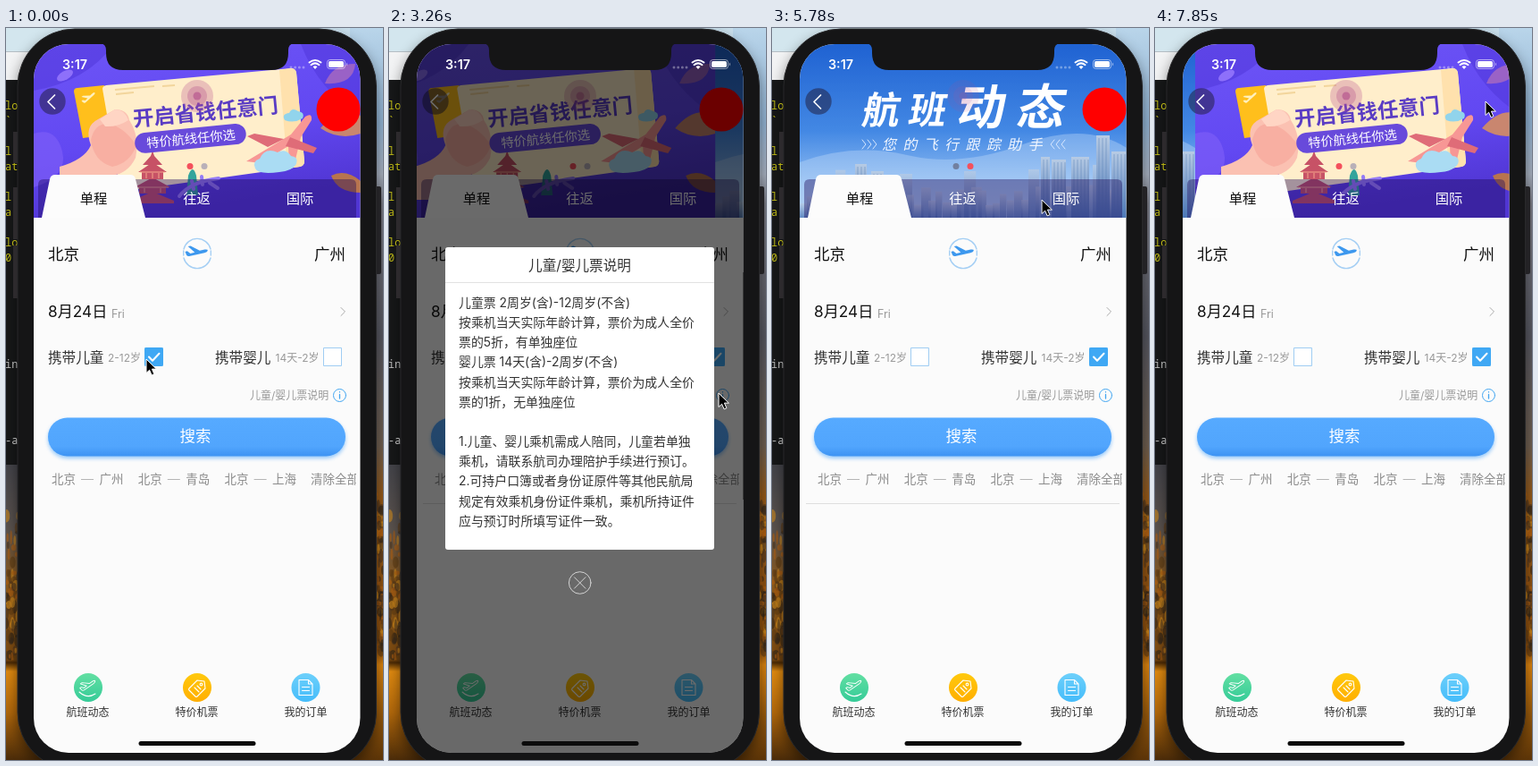
Animation, 422 px wide and 818 px high, one loop 8000 ms. Source, as an HTML page:

```html
<!DOCTYPE html>
<html lang="zh-CN">
<head>
<meta charset="utf-8">
<title>航班查询</title>
<style>
html, body { margin: 0; width: 100%; height: 100%; overflow: hidden; background: #141414; }
svg { display: block; width: 422px; height: 818px; }
text { font-family: Inter, "Noto Sans CJK SC", "Noto Sans CJK", sans-serif; white-space: pre; }
.mono text { font: 12px "Noto Sans Mono", "DejaVu Sans Mono", monospace; }
.mid { text-anchor: middle; }
.line { fill: none; stroke-linecap: round; stroke-linejoin: round; }
.anim { animation: 8s linear infinite; }
.step { animation-timing-function: step-end; }

#slides { animation-name: slides; animation-timing-function: cubic-bezier(.37,0,.63,1); }
@keyframes slides {
  0%, 38.125% { transform: translateX(0); }
  51.875%, 86.125% { transform: translateX(-366px); }
  99.875%, 100% { transform: translateX(-732px); }
}
#dot1 { animation-name: dot1; }
#dot2 { animation-name: dot2; }
@keyframes dot1 { 0% { fill: #f4505c; } 45% { fill: #72809f; } 92.8%, 100% { fill: #f4505c; } }
@keyframes dot2 { 0% { fill: #b9b0b8; } 45% { fill: #f4505c; } 92.8%, 100% { fill: #b9b0b8; } }
#halo { animation-name: halo; }
@keyframes halo { 0%, 38% { opacity: 1; } 52%, 90% { opacity: .45; } 98%, 100% { opacity: 1; } }
#childTick { animation-name: childTick; }
@keyframes childTick { 0% { visibility: visible; } 7.5%, 100% { visibility: hidden; } }
#infantTick { animation-name: infantTick; }
@keyframes infantTick { 0% { visibility: hidden; } 17.5%, 100% { visibility: visible; } }
#rule { animation-name: rule; }
@keyframes rule { 0% { visibility: hidden; } 17.5% { visibility: visible; } 95%, 100% { visibility: hidden; } }
#ball { animation-name: ball; }
@keyframes ball { 0% { visibility: visible; } 95%, 100% { visibility: hidden; } }
#alert { animation-name: alert; }
@keyframes alert { 0%, 34.2% { opacity: 0; } 38%, 60% { opacity: 1; } 63.5%, 100% { opacity: 0; } }
#debug { animation-name: debug; animation-timing-function: ease-in-out; }
@keyframes debug {
  0%, 80.6% { transform: translateY(800px); }
  85.3%, 95% { transform: translateY(0); }
  97.9%, 100% { transform: translateY(800px); }
}
#cursor { animation-name: cursor; animation-timing-function: ease-in-out; }
@keyframes cursor {
  0%, 8.5% { transform: translate(157px,370px); }
  15%, 23% { transform: translate(362px,367px); }
  30.5% { transform: translate(366px,404px); }
  37%, 41.5% { transform: translate(369px,408px); }
  48.1% { transform: translate(227px,575px); }
  54%, 63% { transform: translate(215px,622px); }
  72.2% { transform: translate(302px,192px); }
  77.5%, 84% { transform: translate(371px,88px); }
  89%, 100% { transform: translate(370px,82px); }
}
</style>
</head>
<body>
<svg viewBox="0 0 422 818" xmlns="http://www.w3.org/2000/svg">
<defs>
  <clipPath id="screen"><rect x="31" y="18" width="365.500" height="792" rx="39"/></clipPath>
  <clipPath id="banner"><rect x="31" y="18" width="366" height="194"/></clipPath>
  <clipPath id="recent"><rect x="40" y="490" width="352" height="30"/></clipPath>
  <linearGradient id="sideL" x2="0" y2="1">
    <stop offset="0" stop-color="#44444a"/><stop offset=".22" stop-color="#5b534e"/><stop offset=".4" stop-color="#8d5a1c"/>
    <stop offset=".66" stop-color="#7c4a10"/><stop offset=".67" stop-color="#4a2905"/><stop offset=".7" stop-color="#e08a10"/>
    <stop offset=".84" stop-color="#b2680b"/><stop offset="1" stop-color="#4a2b09"/>
  </linearGradient>
  <linearGradient id="sideR" x2="0" y2="1">
    <stop offset="0" stop-color="#b9d5ea"/><stop offset=".13" stop-color="#8fb0d0"/><stop offset=".2" stop-color="#a5aebd"/>
    <stop offset=".24" stop-color="#74757e"/><stop offset=".42" stop-color="#55565f"/><stop offset=".57" stop-color="#6d5e50"/>
    <stop offset=".64" stop-color="#935818"/><stop offset=".85" stop-color="#8a4d0d"/><stop offset=".87" stop-color="#d9820f"/>
    <stop offset="1" stop-color="#5b3408"/>
  </linearGradient>
  <linearGradient id="violet" x2=".3" y2="1"><stop offset="0" stop-color="#6d55f6"/><stop offset=".6" stop-color="#6248f2"/><stop offset="1" stop-color="#5136d4"/></linearGradient>
  <linearGradient id="sky" x2="0" y2="1"><stop offset="0" stop-color="#1f62d2"/><stop offset=".5" stop-color="#4388e4"/><stop offset=".8" stop-color="#8fbcf1"/><stop offset="1" stop-color="#a9c9ee"/></linearGradient>
  <linearGradient id="tower" x2="0" y2="1"><stop offset="0" stop-color="#b7cbe4"/><stop offset="1" stop-color="#4c78b8"/></linearGradient>
  <linearGradient id="blue" x2="0" y2="1"><stop offset="0" stop-color="#56aaff"/><stop offset=".75" stop-color="#51a5fd"/><stop offset="1" stop-color="#3d93f3"/></linearGradient>
  <linearGradient id="green" x2="0" y2="1"><stop offset="0" stop-color="#62dfa2"/><stop offset="1" stop-color="#35cb98"/></linearGradient>
  <linearGradient id="amber" x2="0" y2="1"><stop offset="0" stop-color="#ffc90d"/><stop offset="1" stop-color="#ffae00"/></linearGradient>
  <linearGradient id="cyan" x2="0" y2="1"><stop offset="0" stop-color="#6dd0fb"/><stop offset="1" stop-color="#45bcfa"/></linearGradient>
  <filter id="soft" x="-20%" y="-50%" width="140%" height="200%"><feGaussianBlur stdDeviation="2"/></filter>
  <filter id="shade"><feGaussianBlur stdDeviation="8"/></filter>
  <path id="jet" d="M-11-1.5l2-.6 3.2 2 4.2-1.4-7-5.2 2.500-.7 9.200 4 4.800-1.500q3.200-.6 3 .9-.3 1.400-3 2.300l-14.500 4.400q-2 .3-2.700-.8z"/>

  <g id="fare">
    <rect x="31" y="18" width="367" height="194" fill="url(#violet)"/>
    <path d="M31 18h90Q90 60 31 70zM330 18h67v80Q350 70 330 18z" fill="#5138da" opacity=".55"/>
    <path d="M31 118q25-8 32 20t-32 40z" fill="#7c5df8" opacity=".7"/>
    <path d="M357 62q8-22 34-22-2 24-34 22z" fill="#9a62c6"/>
    <path d="M352 112q22-26 45-14v20q-24 8-45-6z" fill="#c9866f"/>
    <path d="M364 165q16-8 33 6v13q-26 0-33-19z" fill="#b8744f"/>
    <ellipse cx="66" cy="53" rx="10" ry="5" fill="#8e70fa" transform="rotate(-30 66 53)"/>
    <path d="M76 71q0-4 4-4l30-3 6 55-30 4z" fill="#ffbf1c"/>
    <use href="#jet" transform="translate(93 79) rotate(-25) scale(.8)" fill="#fff0bd"/>
    <path d="M108 68q0-3 4-4l207-19q5 0 6 5l9 99q0 5-5 6l-201 28z" fill="#ffeecb"/>
    <path d="M306 47l13-2q5 0 6 5l9 99q0 5-5 6l-14 2z" fill="#ffe1ad"/>
    <path d="M122 69l44-4M123 74l20-2M175 65l14-1" stroke="#f2d59c" stroke-width="2" fill="none"/>
    <path d="M60 192v-37q28-8 35-24-8-21 8-29l19-11q14 0 16 12 12 18 7 42-8 17-26 20l-19 27z" fill="#fbc1b2"/>
    <path d="M95 125q4-18 18-18 18 2 33 24-7 20-27 24-21-6-24-30z" fill="#f7a89c" opacity=".7"/>
    <path d="M105 102l17-11q11 0 15 12-12 8-26 7z" fill="#ffd5c4"/>
    <path d="M162 143l2-6 2 6 9 10h-22zM148 161l16-11 16 11zM152 160h24v9h-24zM144 178l20-11 20 11zM149 177h30v8h-30zM140 193l24-10 24 10v3h-48z" fill="#c75266"/>
    <path d="M150 161h28M146 178h36M157 162v6M164 162v6M171 162v6M155 179v5M173 179v5" stroke="#f6a68b" fill="none"/>
    <path d="M204 165q5-14 9 0l2 22h-13z" fill="#33a49c"/>
    <path d="M194 188q12-16 44-20M210 180l-2-9M220 175l-1-9M228 173l9 6" stroke="#947bf6" stroke-width="4" class="line"/>
    <path d="M269 149l50-30 16-20q8-5 7 4l-12 19-7 29-6 2-1-21-31 19z" fill="#f79795"/>
    <path d="M293 133l-23-12 8-3 33 6zM318 122l30 12-4 6-31-8z" fill="#df6c78"/>
    <path d="M279 157q-4-8 5-11 6-13 20-7 9-5 15 4 9 1 6 9-5 8-19 9-24 3-27-4z" fill="#aadcf3"/>
    <path d="M312 103q-4-7 5-8 3-7 10-2 8 1 5 8-10 6-20 2z" fill="#91d4ec"/>
    <text x="143" y="110" font-size="23.300" font-weight="800" fill="#5a3cc4" transform="rotate(-5.500 143 110)">开启省钱任意门</text>
    <g transform="rotate(-5.500 206 124)">
      <rect x="144" y="112" width="125" height="23" rx="11.500" fill="#684adb"/>
      <text class="mid" x="207" y="129" font-size="14.300" fill="#fff">特价航线任你选</text>
    </g>
  </g>

  <g id="arrows" class="line" stroke="#d8e8ff" stroke-width="1"><path d="M0-5l4 5-4 5M6-5l4 5-4 5M12-5l4 5-4 5"/></g>
  <path id="box" d="M.5.5h20v20h-20z" fill="#fff" stroke="#9fcdf3"/>
  <g id="tick"><rect width="21" height="21" rx="2" fill="#3fa8f4"/><path class="line" d="M5 10.500l4 4.200 7.500-8" stroke="#fff" stroke-width="2"/></g>
</defs>

<!-- desktop -->
<rect width="200" height="818" fill="#d3e6ee"/>
<rect x="200" width="222" height="60" fill="#c9dfec"/>
<rect y="26" width="80" height="33" fill="#f2f3f4"/>
<path d="M0 26.500h40" stroke="#b5bec4"/>
<rect y="58" width="60" height="431" fill="#171819"/>
<rect y="488" width="60" height="330" fill="url(#sideL)"/>
<rect x="385" width="37" height="818" fill="url(#sideR)"/>
<g id="trees"></g>

<!-- phone -->
<rect x="13" y="8" width="401" height="828" rx="64" opacity=".5" filter="url(#shade)"/>
<g class="mono" id="term"></g>
<path d="M8 116h6v35H8zM8 178h6v58H8zM8 243h6v59H8z" fill="#2d2a2d"/>
<rect x="410" y="177" width="10" height="98" rx="2" fill="#232225"/>
<rect x="13" y="1" width="401.500" height="828" rx="64" fill="#151516" stroke="#29292b"/>

<g clip-path="url(#screen)">
  <rect x="31" y="18" width="366" height="792" fill="#fbfbfb"/>
  <g clip-path="url(#banner)">
    <g id="slides" class="anim">
      <use href="#fare"/>
      <g transform="translate(366 0)">
        <rect x="31" y="18" width="367" height="194" fill="url(#sky)"/>
        <path d="M31 150q60-22 120-8t130-12 116 4v70H31z" fill="#c8dff8" opacity=".35"/>
        <g id="city"></g>
        <g fill="#fff" transform="translate(99 108) skewX(-10)">
          <text font-size="42" font-weight="900" letter-spacing="10" y="-1">航班</text>
          <text font-size="54" font-weight="900" letter-spacing="13" x="106" y="0">动态</text>
        </g>
        <text transform="translate(123 136) skewX(-12)" font-size="16" letter-spacing="7.400" fill="#f2f7ff">您的飞行跟踪助手</text>
        <use href="#arrows" x="101" y="130"/>
        <use href="#arrows" transform="translate(328 130) scale(-1 1)"/>
      </g>
      <use href="#fare" x="732"/>
    </g>
    <g id="halo" class="anim" fill="#b34d8b">
      <circle cx="214" cy="76" r="18" opacity=".28"/><circle cx="214" cy="76" r="11" opacity=".32"/><circle cx="214" cy="76" r="4.500" opacity=".6"/>
    </g>
    <circle id="dot1" class="anim step" cx="206" cy="154.500" r="3.500"/>
    <circle id="dot2" class="anim step" cx="222" cy="154.500" r="3.500"/>
    <path d="M36 212v-37q0-6 6-6h344q6 0 6 6v37z" fill="#1c0858" opacity=".4"/>
    <path d="M40 212l9-43q1-5 6-5h84q5 0 6 5l11 43z" fill="#fcfcfc"/>
  </g>
  <g class="mid" font-size="15.300" font-weight="500" fill="#fff">
    <text x="98" y="196" fill="#111">单程</text><text x="213.500" y="196">往返</text><text x="329" y="196">国际</text>
  </g>
  <circle cx="52" cy="82" r="14.700" fill="#201c3c" opacity=".52"/>
  <path class="line" d="M54.500 75l-7.500 7.500 7.500 7.500" stroke="#fff" stroke-width="1.700"/>

  <g fill="#111" font-size="17.500">
    <text x="47" y="258.500">北京</text><text x="345" y="258.500">广州</text>
    <text x="47" y="322.500" font-size="17.200">8月24日</text>
  </g>
  <g class="line" stroke="#a5cff4" stroke-width="1.400"><path d="M199 247a15.500 15.500 0 0 1 30 0M229 257a15.500 15.500 0 0 1-30 0M198.700 249v5M229.300 249v5"/></g>
  <use href="#jet" transform="translate(213 252.500) rotate(4) scale(1.150)" fill="#3d98ee"/>
  <path class="line" d="M375 312.500l4.500 4.500-4.500 4.500" stroke="#aaa"/>
  <g fill="#999" font-size="12">
    <text x="118" y="324" font-size="12.500">Fri</text>
    <text x="114" y="373">2-12岁</text><text x="301.500" y="373">14天-2岁</text>
    <text x="273" y="415">儿童/婴儿票说明</text>
  </g>
  <g fill="#333" font-size="15.600"><text x="47" y="373.500">携带儿童</text><text x="234" y="373.500">携带婴儿</text></g>
  <use href="#box" x="155" y="357"/><use href="#box" x="355" y="357"/>
  <g id="childTick" class="anim step"><use href="#tick" x="155" y="357"/></g>
  <g id="infantTick" class="anim step"><use href="#tick" x="355" y="357"/></g>
  <g class="line" stroke="#42a5f0"><circle cx="373.500" cy="410.500" r="7"/><path d="M373.500 409.500v4.500M373.500 406.700v.2" stroke-width="1.300"/></g>
  <rect x="47" y="438" width="333" height="43" rx="21.500" fill="#5faefa" opacity=".65" filter="url(#soft)"/>
  <rect x="47" y="435.500" width="333" height="43" rx="21.500" fill="url(#blue)"/>
  <text class="mid" x="212" y="462" font-size="17.500" font-weight="500" fill="#fff">搜索</text>
  <g id="trips" clip-path="url(#recent)" font-size="13.500" fill="#8b8b8b"></g>
  <path id="rule" class="anim step" d="M38 531.500h351" stroke="#dedede"/>

  <circle cx="92" cy="737" r="16" fill="url(#green)"/>
  <circle cx="214" cy="737" r="16" fill="url(#amber)"/>
  <circle cx="335.500" cy="737" r="16" fill="url(#cyan)"/>
  <g class="line" stroke="#fff" stroke-width="1.100">
    <use href="#jet" transform="translate(92 736) rotate(-18) scale(.85)"/><path d="M82 742q9 8 18 2"/>
    <path d="M205 738l9-9 8 1 1 8-9 9q-1 1-2 0l-7-7q-1-1 0-2zM211 737l5 5M214 735l4 4"/><circle cx="218.500" cy="733.500" r="1.400"/>
    <path d="M328 728.500h10.500l4.500 4.500v12.500h-15zM338.500 728.500v4.500h4.500M331.500 736.500h8M331.500 740.500h8"/>
  </g>
  <g class="mid" font-size="12" fill="#333"><text x="91.500" y="768.500">航班动态</text><text x="213.500" y="768.500">特价机票</text><text x="335.500" y="768.500">我的订单</text></g>

  <circle id="ball" class="anim step" cx="372" cy="91" r="24.500" fill="#f00"/>

  <g id="alert" class="anim">
    <rect x="31" y="18" width="366" height="792" opacity=".58"/>
    <rect x="63" y="245" width="301" height="338" rx="3" fill="#fff"/>
    <text class="mid" x="213.500" y="270.500" font-size="15.600" fill="#333">儿童/婴儿票说明</text>
    <path d="M63 284.500h301" stroke="#e2e2e2"/>
    <g id="notes" font-size="13.900" fill="#333"></g>
    <g class="line" stroke="#d2d2d2"><circle cx="213.700" cy="620" r="12.300"/><path d="M207.500 613.800l12.400 12.400M219.900 613.800l-12.400 12.400"/></g>
  </g>

  <g fill="#fff">
    <text x="63" y="45.500" font-size="14.300" font-weight="600">3:17</text>
    <g opacity=".35"><circle cx="319" cy="44" r="1.500"/><circle cx="323.700" cy="44" r="1.500"/><circle cx="328.400" cy="44" r="1.500"/><circle cx="333" cy="44" r="1.500"/></g>
    <path d="M346 46l-2.500-2.700q2.500-2 5 0z"/>
    <path class="line" d="M341.500 41.200q4.500-3.600 9 0M339.500 38.500q6.500-5 13 0" stroke="#fff" stroke-width="2"/>
    <rect x="359.500" y="35.500" width="20" height="10" rx="3" fill="none" stroke="#fff" opacity=".55"/>
    <rect x="361" y="37" width="17" height="7" rx="1.700"/><path d="M381 38.500q2 2 0 4z" opacity=".6"/>
  </g>

  <g id="debug" class="anim">
    <rect x="31" y="18" width="366" height="800" fill="#fff"/>
    <g font-size="17.400" fill="#111">
      <text x="47" y="88.500">退出</text>
      <text class="mid" x="213.500" y="88" font-size="16.300" font-weight="600">Debug</text>
      <text x="345" y="88.500" fill="#f00">隐藏</text>
    </g>
    <path d="M31 104h366" stroke="#c8c8c8"/>
    <g id="rows" font-size="16.600" fill="#111"></g>
    <rect x="331.500" y="601" width="48.500" height="29" rx="14.500" fill="#fff" stroke="#e3e3e3" stroke-width="1.500"/>
    <ellipse cx="346.500" cy="619" rx="14" ry="13.500" opacity=".22" filter="url(#soft)"/>
    <circle cx="346.500" cy="616" r="13.700" fill="#fff"/>
  </g>
  <rect x="148.500" y="797" width="131" height="5" rx="2.500" fill="#0c0c0c"/>
</g>
<path d="M106 17q6 1 6 8v3q0 19 19 19h166q19 0 19-19v-3q0-7 6-8z" fill="#151516"/>

<path id="cursor" class="anim" d="M0 0v15.500l3.600-3.300 2.500 5.700 2.800-1.200-2.500-5.600h5z" stroke="#fff"/>
</svg>
<script>
const ns = 'http://www.w3.org/2000/svg';
const byId = id => document.getElementById(id);
function add(parent, tag, attrs, text) {
  const el = document.createElementNS(ns, tag);
  for (const k in attrs) el.setAttribute(k, attrs[k]);
  if (text) el.textContent = text;
  parent.appendChild(el);
}
let seed = 7;
const rnd = () => (seed = seed * 16807 % 2147483647) / 2147483647;

// autumn trees either side of the phone
const leaves = ['#d08a1c', '#b05f10', '#5d3a12', '#4a3420', '#2f2419'];
for (let i = 0; i < 130; i++) {
  const left = i % 2;
  add(byId('trees'), 'ellipse', {
    cx: left ? rnd() * 14 : 414 + rnd() * 8, cy: left ? 545 + rnd() * 158 : 520 + rnd() * 180,
    rx: 1 + rnd() * 3, ry: 2 + rnd() * 6, fill: leaves[Math.floor(rnd() * leaves.length)], opacity: .6
  });
}

[['lo', 91], ['`', 108], ['l', 142], ['at', 159], ['l', 193], ['a', 210], ['lo', 244], ['0', 261], ['in', 380], ['-a', 465]]
  .forEach(([s, y]) => add(byId('term'), 'text', { x: -1, y, fill: y < 300 ? '#b9b416' : '#b5b5b5' }, s));

// skyline
for (let i = 0; i < 46; i++) {
  const x = 31 + i * 8, w = 7 + rnd() * 7, h = 14 + rnd() * 24 + (i % 9 === 5 ? 22 : 0);
  add(byId('city'), 'rect', { x, y: 212 - h, width: Math.min(w, 397 - x), height: h, fill: 'url(#tower)', opacity: .75 });
}
[[93, 152, 13], [111, 160, 14], [301, 144, 10], [313, 147, 16], [335, 144, 20], [363, 120, 15], [380, 138, 16]].forEach(([x, y, w]) => {
  add(byId('city'), 'rect', { x, y, width: w, height: 212 - y, fill: 'url(#tower)' });
  for (let k = 3; k < w; k += 4)
    add(byId('city'), 'path', { d: `M${x + k} ${y + 3}V212`, stroke: '#5880b5', opacity: .5 });
});

['广州', '青岛', '上海'].forEach((to, i) => {
  const x = 51 + i * 96.8, g = byId('trips');
  add(g, 'text', { x, y: 508.5 }, '北京');
  add(g, 'path', { d: `M${x + 33} 504.500h14`, stroke: '#b5b5b5' });
  add(g, 'text', { x: x + 53.5, y: 508.5 }, to);
});
add(byId('trips'), 'text', { x: 341, y: 508.5 }, '清除全部');

['儿童票 2周岁(含)-12周岁(不含)', '按乘机当天实际年龄计算，票价为成人全价', '票的5折，有单独座位',
 '婴儿票 14天(含)-2周岁(不含)', '按乘机当天实际年龄计算，票价为成人全价', '票的1折，无单独座位', '',
 '1.儿童、婴儿乘机需成人陪同，儿童若单独', '乘机，请联系航司办理陪护手续进行预订。',
 '2.可持户口簿或者身份证原件等其他民航局', '规定有效乘机身份证件乘机，乘机所持证件', '应与预订时所填写证件一致。']
  .forEach((s, i) => add(byId('notes'), 'text', { x: 78, y: 312 + i * 22.15 }, s));

const rows = ['主服务器', '网络请求', '崩溃', '广告', '设备ID', '业务线开关', 'H5业务线测试环境切换', 'UserDefault', 'RN-DEV', '沙盒', '拯救者配置'];
for (let i = 0; i < 14; i++) {
  const y = 152.5 + i * 48.77, s = rows[i];
  add(byId('rows'), 'path', { d: `M47 ${y}h350`, stroke: '#dcdcdc' });
  if (s) add(byId('rows'), 'text', { x: 47, y: y - 18, 'letter-spacing': /^[\w-]+$/.test(s) ? -.55 : 0 }, s);
}
</script>
</body>
</html>
```
